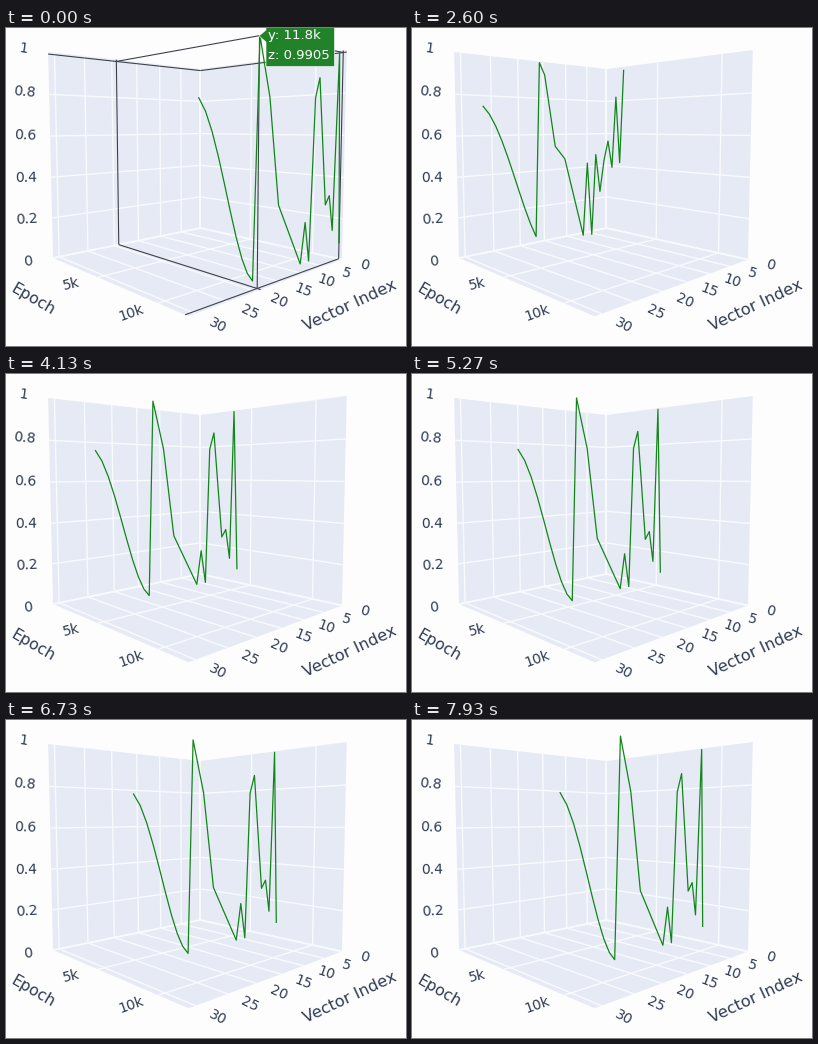
Recreate the animation shown at these times as a matplotlib script. Size 400 px wide and 318 px high, loop 8000 ms.

```python
import math

import numpy as np
import matplotlib.pyplot as plt
from matplotlib.animation import FuncAnimation

W, H, DPI = 400, 318, 100
PX = 72 / DPI                      # points per pixel
FRAMES, LOOP_MS = 120, 8000
E, I = 12.0, 31                    # axis ends: epoch in thousands, vector index
LAST_EPOCH = 0.982 * E

PAPER, WALL, GRID = "#fdfdfe", "#e5eaf5", "#f9fafd"
INK, GREEN, SPIKE, TAG = "#303c52", "#12861a", "#3c4048", "#22822a"


def project(epoch, index, z):
    """Perspective view of the unit box, in pixels."""
    e, u, z = np.asarray(epoch) / E, np.asarray(index) / I, np.asarray(z)
    depth = 1 - 0.2389 * e - 0.2262 * u - 0.025 * z
    x = (194.4 + 61.3 * e - 158 * u - 4.86 * z) / depth
    y = (200 - 23.8 * e - 22 * u - 160 * z) / depth
    return x, y


# --- vector values ---------------------------------------------------------

INDEX = np.arange(29, -1, -1)


def slide(start, end, turn):
    """Cosine fall over the first ten values, ending at angle `turn`."""
    c = np.cos(np.radians(np.linspace(17, turn, 10)))
    return end + (start - end) * (c - c[-1]) / (c[0] - c[-1])


def through(points, index):
    """Straight lines through (index, value) points given in falling order."""
    at, values = zip(*points[::-1])
    return np.interp(index, at, values)


def beat(index):
    """Zigzag whose swing fades out and flips sign halfway."""
    return (-1.0) ** index * np.sin(0.35 * (4.8 - index))


def make_stages():
    fall, tail = INDEX[10:20], INDEX[20:]
    early = [slide(.76, .11, 90),
             through([(19, .89), (17, .85), (15, .67), (11, .16), (10, .04)],
                     fall),
             .5 + .42 * beat(tail)]
    middle = [slide(.74, .075, 138),
              through([(19, .97), (18, .91), (16, .54), (14, .47), (10, .03)],
                      fall),
              .73 - .06 * tail + .25 * beat(tail)]
    late = [slide(.742, .037, 167),
            through([(19, .99), (17, .76), (15, .32), (10, .04), (9, .22),
                     (8, .04), (7, .77), (6, .86), (4, .28), (3, .32),
                     (2, .15), (1, .99), (0, .08)], INDEX[10:])]
    return [np.concatenate(parts) for parts in (early, middle, late)]


EARLY, MIDDLE, LATE = make_stages()


def pose(n):
    """Epoch and vector values at frame n."""
    if n == 0:
        return LAST_EPOCH, LATE
    epoch = E * max(0, 0.0074 * (n - 18.7))
    to_middle = np.clip((n - 20) / 19, 0, 1)
    to_late = np.clip((n - 39) / 16, 0, 1)
    values = EARLY + (MIDDLE - EARLY) * to_middle + (LATE - MIDDLE) * to_late
    return epoch, values


# --- scene -----------------------------------------------------------------

fig = plt.figure(figsize=(W / DPI, H / DPI), dpi=DPI, facecolor=PAPER)
ax = fig.add_axes([0, 0, 1, 1])
ax.set(xlim=(0, W), ylim=(H, 0))
ax.axis("off")


def segment(a, b, color, width, order):
    xs, ys = zip(project(*a), project(*b))
    return ax.plot(xs, ys, color=color, lw=width * PX, zorder=order,
                   solid_capstyle="butt")[0]


def grid(a, b, width=1.4):
    segment(a, b, GRID, width, 2)


def label(x, y, text, size=14, angle=0, color=INK, ha="center", order=5):
    return ax.text(x, y, text, fontsize=size * PX, rotation=angle, color=color,
                   family="DejaVu Sans", ha=ha, va="center", zorder=order)


def tick(anchor, dx, dy, text):
    """Tick label set off from the axis and tilted along that offset."""
    x, y = project(*anchor)
    label(x + dx, y + dy, text, angle=-math.degrees(math.atan(dy / dx)))


def draw_box():
    faces = [[(0, 0, 0), (0, I, 0), (0, I, 1), (0, 0, 1)],
             [(0, 0, 0), (E, 0, 0), (E, 0, 1), (0, 0, 1)],
             [(0, 0, 0), (E, 0, 0), (E, I, 0), (0, I, 0)]]
    for face in faces:
        ax.fill(*zip(*[project(*p) for p in face]), color=WALL, lw=0, zorder=1)

    for i in range(5, 31, 5):
        grid((0, i, 0), (0, i, 1))
        grid((0, i, 0), (E, i, 0))
    for e in (5, 10):
        grid((e, 0, 0), (e, 0, 1))
        grid((e, 0, 0), (e, I, 0))
    for z in np.arange(1, 5) / 5:
        grid((0, 0, z), (0, I, z))
        grid((0, 0, z), (E, 0, z))
    for end in ((E, 0, 0), (0, I, 0), (0, 0, 1)):
        grid((0, 0, 0), end, 1.9)


def draw_labels():
    for z in np.arange(6) / 5:
        tick((0, I, z), -24.7, 3 - 6.5 * z, f"{z:g}")
    for e in (5, 10):
        tick((e, I, 0), -27, 3.5 + 0.6 * e, f"{e}k")
    for i in range(0, 31, 5):
        tick((E, i, 0), 22.3, 5.8 + 0.2 * i, str(i))
    label(27, 272, "Epoch", 15.8, -30)
    label(344, 277.5, "Vector Index", 16.1, 25)


def draw_hover():
    e, i, z = LAST_EPOCH, 19.1, 0.9905
    point = (e, i, z)
    pairs = [(point, (0, i, z)), (point, (e, 0, z)), (point, (e, i, 0)),
             ((0, i, 0), (0, i, 1)), ((0, 0, z), (0, I, z)),
             ((e, 0, 0), (e, 0, 1)), ((0, 0, z), (E, 0, z)),
             ((0, i, 0), (E, i, 0)), ((e, 0, 0), (e, I, 0))]
    parts = [segment(a, b, SPIKE, 1.1, 3) for a, b in pairs]
    tag = [(253, 8), (260, 2), (260, -20), (328.5, -20), (328.5, 38.5),
           (260, 38.5), (260, 14)]
    parts += ax.fill(*zip(*tag), facecolor=TAG, edgecolor=PAPER,
                     lw=0.6 * PX, zorder=6)
    for y, text in ((8, "y: 11.8k"), (27.3, "z: 0.9905")):
        parts.append(label(262.5, y, text, 13.2, color="white", ha="left",
                           order=7))
    return parts


draw_box()
draw_labels()
hover = draw_hover()
curve, = ax.plot([], [], color=GREEN, lw=1.25 * PX, zorder=4,
                 solid_joinstyle="round")


def update(n):
    epoch, values = pose(n)
    curve.set_data(*project(epoch, INDEX, values))
    for part in hover:
        part.set_visible(n == 0)
    return [curve, *hover]


anim = FuncAnimation(fig, update, frames=FRAMES, interval=LOOP_MS / FRAMES,
                     repeat=True, repeat_delay=0, blit=False)
plt.show()
```
